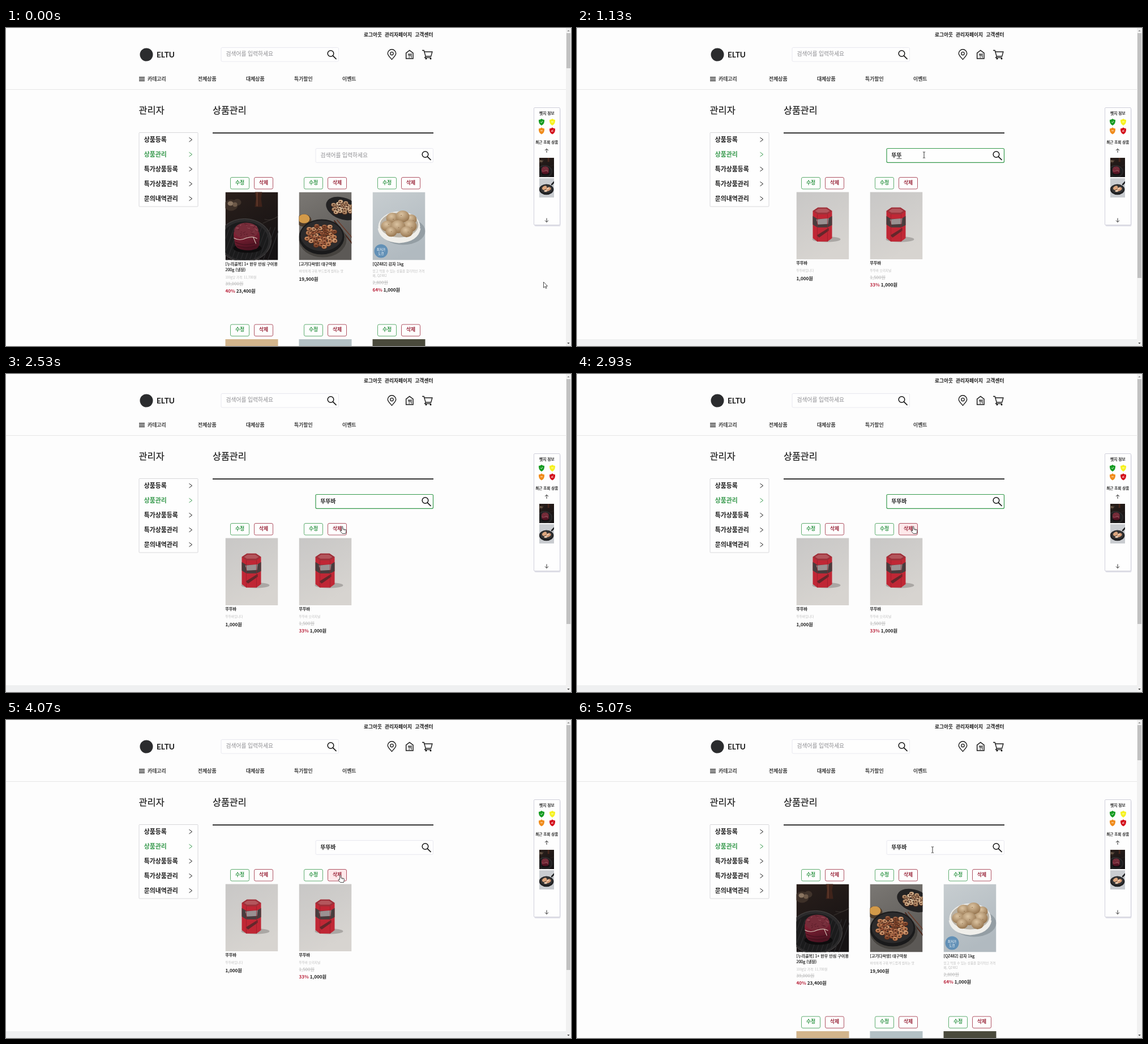
These frames come from a looping animation (998x561 px, 5.11 s). An HTML page:

```html
<!DOCTYPE html>
<html lang="ko">
<head>
<meta charset="utf-8">
<title>상품관리</title>
<style>
html, body { margin: 0; width: 100%; height: 100%; overflow: hidden; background: #fdfdfd; }
svg { display: block; }
text { font-family: "Noto Sans CJK KR", "Noto Sans CJK JP", "Noto Sans CJK", sans-serif; white-space: pre; }
</style>
</head>
<body>
<svg id="stage" width="998" height="561" viewBox="0 0 998 561"></svg>
<script>
const LOOP = 5110;
const GREEN = '#36994c', RED = '#9c2a3e', INK = '#1c1c1c', PALE = '#e4e4ec';
const BRAND = 'ELTU', QUERY = '뚜뚜바';
const stage = document.getElementById('stage');

let seed = 7;
const rand = () => (seed = seed * 16807 % 2147483647) / 2147483647;
const spread = (mid, range) => mid + (rand() - .5) * 2 * range;

const text = (x, y, s, size, fill = INK, weight = 400, extra = '') =>
  `<text x="${x}" y="${y}" font-size="${size}" fill="${fill}" font-weight="${weight}" ${extra}>${s}</text>`;
// Regular letters with a hairline outline, for a medium weight
const medium = (x, y, s, size, extra = '') =>
  text(x, y, s, size, INK, 400, `stroke="${INK}" stroke-width=".22" ${extra}`);
const rect = (x, y, w, h, fill, extra = '') =>
  `<rect x="${x}" y="${y}" width="${w}" height="${h}" fill="${fill}" ${extra}/>`;
const oval = (cx, cy, rx, ry, fill, extra = '') =>
  `<ellipse cx="${cx}" cy="${cy}" rx="${rx}" ry="${ry}" fill="${fill}" ${extra}/>`;
const line = (d, stroke, w = 1, extra = '') =>
  `<path d="${d}" fill="none" stroke="${stroke}" stroke-width="${w}" ${extra}/>`;
const shape = (d, fill, extra = '') => `<path d="${d}" fill="${fill}" ${extra}/>`;
const group = (id, body, extra = '') => `<g id="${id}" ${extra}>${body}</g>`;
const repeat = (n, make) => Array.from({ length: n }, (_, i) => make(i)).join('');
const photo = (x, y, w, h, body) =>
  `<svg x="${x}" y="${y}" width="${w}" height="${h}" viewBox="0 0 93 120" preserveAspectRatio="xMidYMid slice">${body}</svg>`;
const lens = (x, y) =>
  line(`M${x + 3.8} ${y + 3.8}L${x + 10} ${y + 10}`, '#111', 1.7) +
  `<circle cx="${x}" cy="${y}" r="5.3" fill="none" stroke="#111" stroke-width="1.5"/>`;

// Pictures, each in a 93 x 120 space
function steak() {
  const marbling = repeat(26, () => {
    const a = rand() * 6.28, d = Math.sqrt(rand());
    const x = 37 + Math.cos(a) * d * 18, y = 67 + Math.sin(a) * d * 11;
    return line(`M${x} ${y}q${spread(0, 3)} ${spread(0, 2)} ${spread(0, 6)} ${spread(0, 3)}`,
      rand() < .5 ? '#a8606a' : '#4f1722', .8);
  });
  return rect(0, 0, 93, 120, 'url(#night)') +
    oval(10, 23, 12, 10, '#3d3028') + oval(21, 18, 7, 6, '#40332b') +
    oval(9, 20, 5, 4, '#8a7561') + oval(17, 22, 4, 4, '#6e5a49') +
    shape('M52 26l2 -15l-2 -12h13l-2 12l2 15z', '#3f231a') + line('M56 0v25', '#6b4030', 1.6) +
    line('M69 48q12 4 24 -6M66 55l26 -11', '#3e3734', .9) +
    oval(34, 85, 47, 38, '#2b2a2b', 'stroke="#4d4a49" stroke-width="1"') +
    oval(34, 86, 42, 34, '#1b1b1c') +
    repeat(12, i => line(`M${-14 + i * 8} 122l22 -60`, '#2b2a2c', 1.3)) +
    oval(39, 99, 25, 8, '#0d0c0d') +
    shape('M15 70q-1 9 1 15q0 10 6 14q16 7 33 1q6 -4 5 -13q2 -9 -1 -17z', 'url(#meat)') +
    oval(37, 68, 21.5, 14, '#752c39') + marbling +
    line('M17 88q18 9 40 1M20 95q17 6 34 0', '#3f101b', 1.2) +
    line('M15 81q10 6 22 0q12 -4 19 1M49 79l5 12', '#d8c6ba', 1.1);
}

function fillets() {
  return rect(0, 0, 93, 120, '#c9ccd0') +
    oval(45, 70, 45, 33, '#1d1e20') + oval(45, 67, 39, 26, '#333334') +
    line('M76 42L100 16', '#1d1e20', 9) +
    oval(33, 60, 16, 11, '#dda67e', 'transform="rotate(-35 33 60)"') +
    oval(57, 68, 17, 11, '#d39a75', 'transform="rotate(-28 57 68)"') +
    oval(54, 64, 9, 4, '#f0d3b9', 'transform="rotate(-28 54 64)"') +
    oval(40, 79, 10, 6, '#efcfb4');
}

function heap(cx, cy, rx, ry, n, tones, r) {
  return repeat(n, i => {
    const a = i * 2.4, d = Math.sqrt((i + .5) / n);
    const x = cx + Math.cos(a) * d * rx, y = cy + Math.sin(a) * d * ry;
    const tone = tones[Math.floor(rand() * tones.length)];
    return oval(x, y + .8, r, r * .8, '#4b291b') + oval(x, y, r * .92, r * .7, tone) +
      oval(x + spread(0, 1), y + .3, r * .35, r * .24, '#5a2f1e') +
      line(`M${x - r * .6} ${y - r * .3}q${r * .5} ${-r * .4} ${r} 0`, '#e2bb93', .6);
  });
}

function rings() {
  return rect(0, 0, 93, 120, 'url(#slate)') +
    `<g transform="rotate(20 78 28)">${oval(78, 29, 31, 19, '#232223')}</g>` +
    heap(76, 27, 20, 11, 17, ['#c8a784', '#dbc2a1', '#a98463'], 4.5) +
    oval(9, 50, 13, 11, '#4e3c2b') + oval(9, 47, 10, 8, '#d39a49') +
    line('M62 50L95 92', '#4a2419', 1.9) + line('M67 49L97 84', '#6a3928', 1.5) +
    oval(42, 84, 42, 31, '#46433f') +
    oval(40, 79, 40, 31, '#1a1a1b') + oval(40, 77, 37, 27, '#2c2b2c') +
    heap(40, 77, 28, 20, 34, ['#99573a', '#b9784f', '#7f442a', '#c78f68'], 4.9);
}

function potatoes() {
  const spots = [[35, 46, 11], [68, 48, 10], [53, 43, 12], [26, 60, 11], [66, 60, 12], [45, 61, 13], [33, 70, 10], [60, 70, 11]];
  return rect(0, 0, 93, 120, 'url(#mist)') +
    oval(54, 69, 39, 24, '#949ea4') +
    oval(47, 61, 37, 27, '#efeeea') + oval(47, 58, 34, 22, '#b9b2a6') +
    spots.map(([x, y, r]) => oval(x, y, r, r * .88, 'url(#spud)') +
      oval(x + spread(0, 4), y + spread(0, 4), .9, .6, '#8a6b4a')).join('') +
    line('M11 64q4 22 36 24q32 -2 36 -24', '#efeeea', 4) +
    oval(15, 104, 12, 12, '#6290b6') +
    text(15, 103, '최저가', 5.6, '#fff', 400, 'text-anchor="middle"') +
    text(15, 110, '도전', 5.6, '#fff', 400, 'text-anchor="middle"');
}

function tin() {
  return rect(0, 0, 93, 120, 'url(#paper)') +
    oval(53, 84, 25, 5, '#aaa7a4') +
    shape('M29 34L38 28H54L63 34V82L55 88H37L29 82z', '#c02735') +
    shape('M29 34L38 28H54L63 34L55 40H37z', '#9d3039') +
    shape('M33 34L39 30H53L59 34L54 37H38z', '#b3565c') +
    shape('M29 43L37 48H55L63 43V59L55 63H37L29 58z', '#493c3d') +
    shape('M35 49L57 47L56 57L38 58z', '#9a9192') +
    shape('M36 77L57 64V69L40 81z', '#64272b') +
    line('M37 40V88M55 40V88', '#951f2b', .7);
}

const button = (x, y, label, color, id = '') =>
  rect(x, y, 33, 20.5, '#fefefe', `rx="2.5" stroke="${color}" stroke-width=".8" ${id && `id="${id}"`}`) +
  text(x + 16.5, y + 12.3, label, 8.8, color, 700, 'text-anchor="middle"');
const buttons = (x, y, id) =>
  button(x + 9, y, '수정', GREEN) + button(x + 51, y, '삭제', RED, id);

const note = (x, y, s) => text(x, y, s, 5.6, '#bcbcbc');
const oldPrice = (x, y, s) => text(x, y, s, 8, '#b8b8b8', 400, 'text-decoration="line-through"');
const price = (x, y, s, off) => off
  ? text(x, y, off, 8.1, '#b81f38', 700) + text(x + 19.3, y, s, 8.1, INK, 700)
  : text(x, y, s, 8.1, INK, 700);

const COLS = [387.5, 517.5, 647.5];

function fullList() {
  const [a, b, c] = COLS;
  const below = ['#d3b58c', '#b4c1c5', '#4a4a3c'];
  return COLS.map((x, i) => buttons(x, 263.5) + buttons(x, 523) +
      rect(x, 549, 93, 12, below[i])).join('') +
    photo(a, 289.5, 93, 120, steak()) +
    medium(a, 419, '[누리골목] 1+ 한우 안심 구이용', 7.1) + medium(a, 428.7, '200g (냉장)', 7.1) +
    note(a, 441.5, '100g당 가격: 11,700원') + oldPrice(a, 454.3, '39,000원') +
    price(a, 467, '23,400원', '40%') +
    photo(b, 289.5, 93, 120, rings()) +
    medium(b, 419, '[고기다락방] 대구막창', 7.1) +
    note(b, 431, '바삭하게 구워 부드럽게 씹히는 맛') + price(b, 445.7, '19,900원') +
    photo(c, 289.5, 93, 120, potatoes()) +
    medium(c, 419, '[QZ482] 감자 1kg', 7.1) +
    note(c, 430.5, '믿고 먹을 수 있는 상품을 합리적인 가격') + note(c, 438.5, '에, QZ482') +
    oldPrice(c, 451.8, '2,800원') + price(c, 464.5, '1,000원', '64%') +
    rect(990, 9, 7, 62, '#c1c1c1');
}

function foundList() {
  const [a, b] = COLS;
  return [a, b].map((x, i) => buttons(x, 263.5, i ? 'remove' : '') +
      photo(x, 289.5, 93, 118.5, tin()) + text(x, 417.3, QUERY, 7.1, INK, 700)).join('') +
    note(a, 430, QUERY + '입니다') + price(a, 444.7, '1,000원') +
    note(b, 430, QUERY + ' 오리지널') + oldPrice(b, 443, '1,500원') +
    price(b, 455.7, '1,000원', '33%') +
    rect(0, 549, 989, 12, '#eff0f1') + rect(990, 9, 7, 432, '#c1c1c1');
}

function header() {
  const pin = line('M681.5 55.5C677 50.5 674.3 48 674.3 45A7.2 7.2 0 0 1 688.7 45C688.7 48 686 50.5 681.5 55.5z', INK, 1.4) +
    `<circle cx="681.5" cy="45" r="2.7" fill="none" stroke="${INK}" stroke-width="1.3"/>`;
  const house = line('M706.7 54V44.2L712.8 39.5L719 44.2V54z', INK, 1.5) +
    line('M710.7 45v3M712.2 45v8M713.7 45v3M710.7 48h3M716 53v-8q-1.6 2 -1 5h1', INK, .9);
  const cart = line('M735 39.5h3.2l3 10.5h9.5l2.2 -8h-14M741.2 50l-1.4 2.4h11', INK, 1.4) +
    oval(742, 54, 1.5, 1.5, INK) + oval(750, 54, 1.5, 1.5, INK);
  const links = [[632, '로그아웃'], [669, '관리자페이지'], [722.6, '고객센터']];
  const nav = [[250, '카테고리'], [339, '전체상품'], [424, '대체상품'], [509, '특가할인'], [594, '이벤트']];
  return links.map(([x, s]) => text(x, 15.3, s, 8.7, INK, 700)).join('') +
    `<circle cx="248" cy="47" r="11.5" fill="#2b2c2e"/>` +
    text(266, 51.5, BRAND, 13.6, INK, 700, 'style="font-family:Lato,sans-serif"') +
    rect(380, 34.5, 207.5, 24.5, '#fefefe', `rx="2" stroke="${PALE}" stroke-width=".8"`) +
    text(388.5, 49.3, '검색어를 입력하세요', 9.75, '#8c8c90') + lens(573.5, 45) +
    pin + house + cart +
    line('M235 87H245M235 90H245M235 93H245', INK, 1.3) +
    nav.map(([x, s]) => medium(x, 92.6, s, 8.9)).join('') +
    line('M0 108.5H989', '#e6e6e6');
}

function sidebar() {
  const items = ['상품등록', '상품관리', '특가상품등록', '특가상품관리', '문의내역관리'];
  return medium(234.5, 151, '관리자', 16.4) + medium(365, 151, '상품관리', 16.2) +
    rect(365, 184.3, 390, 1.8, INK) +
    rect(235, 184.5, 104, 130.5, '#fefefe', 'rx="1" stroke="#cfcfd2" stroke-width=".8"') +
    items.map((s, i) => {
      const y = 197 + i * 26, color = i === 1 ? GREEN : INK;
      return text(243.7, y + 3.8, s, 10.9, color, 700) +
        line(`M323.5 ${y - 3.8}l5 3.8l-5 3.8`, color, 1);
    }).join('');
}

function recent() {
  const shield = (x, y, c, mark) =>
    shape(`M${x} ${y - 6}q2.5 2 5 2q.6 7.5 -5 10q-5.6 -2.5 -5 -10q2.5 0 5 -2z`, c) +
    line(`M${x - 1.8} ${y - .3}${mark}`, '#fff', .9);
  const mid = 'text-anchor="middle"';
  return rect(933.5, 142, 46, 208, '#e2e2ea', 'rx="2"') +
    rect(932.5, 140.5, 46, 207, '#fefefe', 'rx="1.5" stroke="#c6c6d4" stroke-width=".8"') +
    medium(955.3, 153, '뱃지 정보', 6.7, mid) +
    shield(946, 166, '#169b22', 'l1.4 1.5l2.4 -3') + shield(965, 166, '#f6f224', 'h3.6') +
    shield(946, 181.5, '#f08c1c', 'h3.6') + shield(965, 181.5, '#d3101c', 'l3.4 1.5m0 -3l-3.4 3') +
    medium(955.3, 204.4, '최근 조회 상품', 6.6, mid) +
    line('M955 220V213M952 216l3 -3l3 3M955 335.5V342.5M952 339.5l3 3l3 -3', INK, .9) +
    photo(942, 229, 26, 34, steak()) + photo(942, 265, 26, 34, fillets());
}

const stops = (from, to) => `<stop stop-color="${from}"/><stop offset="1" stop-color="${to}"/>`;
const gradient = (id, from, to) =>
  `<linearGradient id="${id}" x2=".4" y2="1">${stops(from, to)}</linearGradient>`;
const ball = (id, from, to) =>
  `<radialGradient id="${id}" cx=".42" cy=".32" r=".68">${stops(from, to)}</radialGradient>`;

stage.innerHTML =
  `<defs>${gradient('night', '#2a1f1b', '#151213')}${gradient('slate', '#7b7874', '#5c5956')}` +
  `${gradient('mist', '#c7cdd0', '#b1bac0')}${gradient('paper', '#c8c7c6', '#d7d4d0')}` +
  `${gradient('meat', '#8b2438', '#4d1322')}${ball('spud', '#dcc4a2', '#96754f')}</defs>` +
  rect(0, 0, 998, 561, '#fdfdfd') + rect(989, 0, 9, 561, '#f1f1f1') +
  shape('M991.3 6l2.2 -2.6l2.2 2.6z', '#909090') + shape('M991.3 555l2.2 2.6l2.2 -2.6z', '#444') +
  header() + sidebar() +
  group('full', fullList()) + group('found', foundList()) +
  rect(547, 212.5, 207.5, 24.8, '#fefefe', 'id="field" rx="2"') +
  text(555.5, 227.6, '', 9.75, INK, 400, 'id="entry"') +
  rect(0, 229.8, 9, .9, '#444', 'id="compose"') + rect(583.4, 219, .9, 11.5, '#111', 'id="caret"') +
  lens(740.5, 223) + recent() +
  group('arrow', shape('M0 0V10.2L2.4 8L4 11.4L5.6 10.7L4 7.3H7z', '#fff', 'stroke="#222" stroke-width=".8"')) +
  group('beam', line('M-2 -5.2H-.5L0 -4.7L.5 -5.2H2M0 -4.7V4.7M-2 5.2H-.5L0 4.7L.5 5.2H2', '#222', .9)) +
  group('hand', shape('M-1 1Q0 -.8 1 1V5L6 6Q7.2 6.4 7 8L6 13H0L-3.6 8.6Q-3.6 7 -1 8z', '#fff', 'stroke="#222" stroke-width=".8"') +
    line('M2.8 5.5v2M4.8 6v2', '#222', .6));

const parts = Object.fromEntries(['full', 'found', 'field', 'entry', 'compose', 'caret', 'remove', 'arrow', 'beam', 'hand']
  .map(id => [id, document.getElementById(id)]));
const show = (el, on) => el.setAttribute('visibility', on ? 'visible' : 'hidden');
const clamp = v => Math.max(0, Math.min(1, v));
const ease = v => v * v * (3 - 2 * v);

// time, x, y of the pointer's hot spot
const PATH = [[30, 949.5, 448], [540, 748, 340], [740, 614.5, 225], [1000, 613, 224], [2470, 613, 224],
  [2530, 594, 268.5], [3000, 594, 268.5], [3280, 590.5, 273.5], [4530, 590.5, 273.5], [5000, 628, 229]];
const TYPING = [[930, 'ㄸ'], [990, '뚜'], [1050, '뚜ㄸ'], [1110, '뚜뚜'], [1170, '뚜뚜ㅂ'], [1230, QUERY]];

function pointer(t) {
  if (t <= PATH[0][0]) return PATH[0].slice(1);
  for (let i = 1; i < PATH.length; i++) {
    const [t0, x0, y0] = PATH[i - 1], [t1, x1, y1] = PATH[i];
    if (t < t1) {
      const k = ease((t - t0) / (t1 - t0));
      return [x0 + (x1 - x0) * k, y0 + (y1 - y0) * k];
    }
  }
  return PATH[PATH.length - 1].slice(1);
}

function draw(t) {
  const found = t >= 1130 && t < 4200;
  show(parts.full, !found);
  show(parts.found, found);

  const focus = t >= 850 && t < 3600;
  parts.field.setAttribute('stroke', focus ? GREEN : PALE);
  parts.field.setAttribute('stroke-width', focus ? 1.2 : .8);

  const typed = TYPING.reduce((s, [at, v]) => t >= at ? v : s, '');
  parts.entry.textContent = typed || '검색어를 입력하세요';
  parts.entry.setAttribute('fill', typed ? INK : '#8c8c90');
  parts.entry.setAttribute('font-weight', typed ? 700 : 400);
  show(parts.compose, typed && t < 2490);
  parts.compose.setAttribute('x', 555.5 + 9 * Math.max(0, typed.length - 1));
  show(parts.caret, t >= 2130 && t < 2270 || t >= 3000 && t < 3330);

  const hover = ease(clamp((t - 2560) / 250));
  parts.remove.setAttribute('fill', `rgb(254,${254 - 22 * hover},${254 - 20 * hover})`);

  const [x, y] = pointer(t);
  const overField = x > 547 && x < 755 && y > 212 && y < 238;
  const overButton = found && x > 568 && x < 602 && y > 263 && y < 285;
  const kind = overField ? 'beam' : overButton || t > 4200 && y > 263 ? 'hand' : 'arrow';
  for (const k of ['arrow', 'beam', 'hand']) show(parts[k], k === kind);
  parts[kind].setAttribute('transform', `translate(${x} ${y})`);
}

const start = performance.now();
function tick() {
  draw((performance.now() - start) % LOOP);
  requestAnimationFrame(tick);
}
draw(0);
requestAnimationFrame(tick);
</script>
</body>
</html>
```
